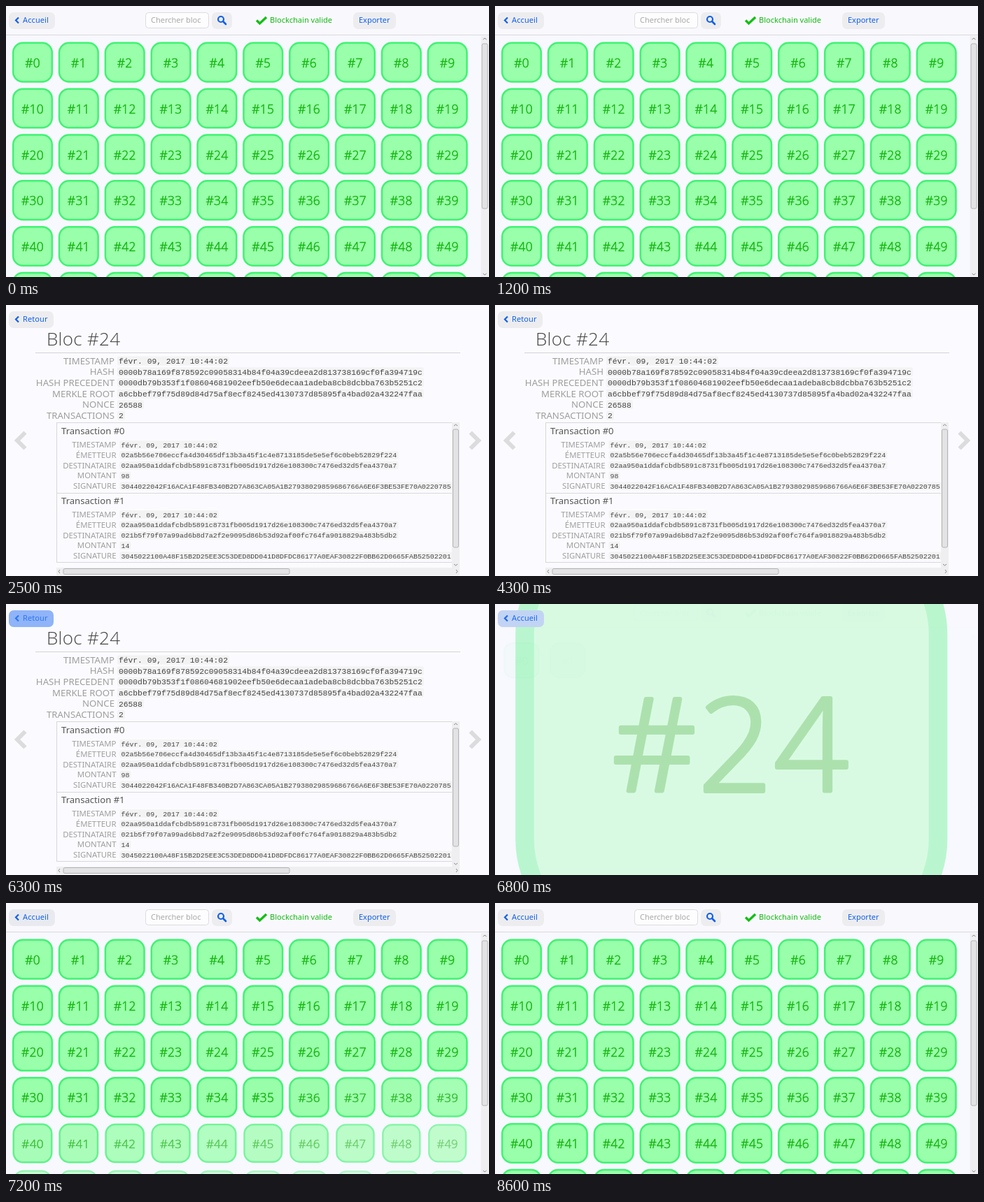
An HTML page that plays this animation: 690 px wide and 388 px high, repeating every 8900 ms.

```html
<!DOCTYPE html>
<html lang="fr">
<head>
<meta charset="utf-8">
<style>
  html, body { margin: 0; width: 100%; height: 100%; overflow: hidden; background: #f8f8ff; }
  svg { display: block; width: 690px; height: 388px; }
  text { font-family: "Noto Sans", sans-serif; white-space: pre; }
  .light { font-family: "Open Sans", "Noto Sans", sans-serif; font-weight: 300; letter-spacing: .3px; }
  .mono { font-family: "Liberation Mono", monospace; }
  .tile rect { fill: #99ffaa; stroke: #3ef472; stroke-width: 2.5; }
  .tile text { fill: #16b510; stroke: #16b510; stroke-width: .55; stroke-linejoin: round; }
</style>
</head>
<body>
<svg id="stage" viewBox="0 0 690 388"></svg>
<script>
const LOOP = 8900, OPENED = 24, PITCH = 65.85;
const BLUE = '#1160e8', BUTTON = '#ededf0';

// Markup helpers
const rect = (x, y, w, h, fill, extra = '') =>
  `<rect x="${x}" y="${y}" width="${w}" height="${h}" fill="${fill}" ${extra}/>`;
const text = (x, middle, size, fill, str, extra = '') =>
  `<text x="${x}" y="${middle + size * .357}" font-size="${size}" fill="${fill}" ${extra}>${str}</text>`;
const line = (d, color, width, extra = '') =>
  `<path d="${d}" fill="none" stroke="${color}" stroke-width="${width}" ${extra}/>`;
const group = (id, content) => `<g id="${id}">${content}</g>`;
const button = (x, w) => rect(x, 9, w, 24, BUTTON, 'rx="7"');

function scrollbar(x, y, length, from, to, vertical) {
  const bar = (a, b, size, fill, extra) => vertical
    ? rect(x + (11 - size) / 2, a, size, b - a, fill, extra)
    : rect(a, y + (11 - size) / 2, b - a, size, fill, extra);
  const start = vertical ? y : x, end = start + length;
  const tip = (p, dir) => vertical
    ? line(`M${x + 3} ${p + dir}l2.5 ${-2 * dir} 2.5 ${2 * dir}`, '#888', 1)
    : line(`M${p + dir} ${y + 3}l${-2 * dir} 2.5 ${2 * dir} 2.5`, '#888', 1);
  return bar(start, end, 11, '#efeff1') + bar(from, to, 8, '#e3e3e5', 'rx="2" stroke="#b4b4b8"')
    + tip(start + 4, 1) + tip(end - 4, -1);
}

function tile(n) {
  return `<g class="tile" id="tile${n}">${rect(-27.8, -27.8, 55.6, 55.6, '#9fa', 'rx="14"')}` +
    `<text class="light" y="7.3" font-size="17.4" text-anchor="middle">#${n}</text></g>`;
}

// Label on the left, monospaced value on a grey background
function field(right, middle, labelSize, monoSize, gap, [label, value]) {
  const x = right + gap;
  return text(right, middle, labelSize, '#9e9e9e', label, 'text-anchor="end"') +
    rect(x - 2, middle - monoSize * .57, value.length * monoSize * .6 + 4, monoSize * 1.14, '#f3f3f4', 'rx="2"') +
    text(x, middle, monoSize, '#444', value, 'class="mono"');
}

function transaction(n, top, rows) {
  return text(79, top + 11, 13.1, '#555', `Transaction #${n}`) +
    rows.map((row, i) => field(157.5, top + 31 + i * 14.8, 11.4, 9.95, 7, row)).join('');
}

const DATE = 'févr. 09, 2017 10:44:02';
const WALLET = '02aa950a1ddafcbdb5891c8731fb005d1917d26e108300c7476ed32d5fea4370a7';
const block = [
  ['TIMESTAMP', DATE],
  ['HASH', '0000b78a169f878592c09058314b84f04a39cdeea2d813738169cf0fa394719c'],
  ['HASH PRECEDENT', '0000db79b353f1f08604681902eefb50e6decaa1adeba8cb8dcbba763b5251c2'],
  ['MERKLE ROOT', 'a6cbbef79f75d89d84d75af8ecf8245ed4130737d85895fa4bad02a432247faa'],
  ['NONCE', '26588'],
  ['TRANSACTIONS', '2'],
];
const transfers = [[
  ['TIMESTAMP', DATE],
  ['ÉMETTEUR', '02a5b56e706eccfa4d30465df13b3a45f1c4e8713185de5e5ef6c0beb52829f224'],
  ['DESTINATAIRE', WALLET],
  ['MONTANT', '98'],
  ['SIGNATURE', '3044022042F16ACA1F48FB340B2D7A863CA05A1B27938029859686766A6E6F3BE53FE70A0220785'],
], [
  ['TIMESTAMP', DATE],
  ['ÉMETTEUR', WALLET],
  ['DESTINATAIRE', '021b5f79f07a99ad6b8d7a2f2e9095d86b53d92af00fc764fa9018829a483b5db2'],
  ['MONTANT', '14'],
  ['SIGNATURE', '3045022100A48F15B2D25EE3C53DED8DD041D8DFDC86177A0EAF30822F0BB62D0665FAB52502201'],
]];

const order = [...Array(60).keys()];
const header =
  rect(0, 0, 690, 41, '#f9f9fd') + rect(0, 41, 690, 1, '#d9d9de') +
  rect(199.5, 9.5, 90, 22, '#fdfdff', 'rx="4" stroke="#dcdce0"') +
  text(207, 20.5, 11, '#aaa', 'Chercher bloc') +
  button(294, 29) +
  `<circle cx="307" cy="19" r="4" fill="none" stroke="${BLUE}" stroke-width="2.2"/>` +
  line('M310 22l4 4', BLUE, 2.6, 'stroke-linecap="round"') +
  line('M358 20.5l4.5 4.5 9.5-9', '#12c012', 3.4) +
  text(377, 20.5, 11, '#12b812', 'Blockchain valide') +
  button(496, 61) + text(504, 20.5, 11, BLUE, 'Exporter');

const detail =
  rect(0, 0, 690, 388, '#fbfbff') +
  text(58, 48.5, 26, '#444', `Bloc #${OPENED}`, 'class="light"') +
  rect(42, 68, 607, 1, '#d4d4d8') +
  block.map((row, i) => field(155, 80 + i * 15.65, 13.2, 11.3, 6, row)).join('') +
  rect(72.5, 168.5, 575, 200, 'none', 'stroke="#d8d8dc"') + rect(72, 269, 565, 1, '#d8d8dc') +
  transfers.map((rows, i) => transaction(i, 169 + i * 100, rows)).join('') +
  scrollbar(637, 168, 208, 178, 347, true) + scrollbar(72, 376, 576, 82, 405, false) +
  line('M27.5 182.5l-11.5 11.5 11.5 11.5M663.5 182.5l11.5 11.5-11.5 11.5', '#dcdcdf', 6);

stage.innerHTML =
  group('scroll', scrollbar(678.5, 43, 345, 54, 290, true)) +
  group('header', header) +
  order.filter(n => n !== OPENED).map(tile).join('') + tile(OPENED) +
  group('detail', detail) +
  group('nav',
    rect(4, 9, 66, 24, BUTTON, 'rx="7" id="navBack"') +
    line('M18 16.5l-4 4 4 4', BLUE, 2.2) +
    text(24, 20.5, 11, BLUE, '', 'id="navLabel" letter-spacing=".1"') +
    rect(4, 9, 66, 24, '#4488ff', 'rx="7" id="navTint"'));

const el = id => document.getElementById(id);
const set = (id, attrs) => { for (const k in attrs) el(id).setAttribute(k, attrs[k]); };
const ramp = (t, start, duration) => Math.min(1, Math.max(0, (t - start) / duration));
const ease = u => u < .5 ? 4 * u ** 3 : 1 - 4 * (1 - u) ** 3;

function draw(t) {
  const leaving = t < 4000;

  order.forEach(n => {
    let x = 38 + n % 10 * PITCH, y = 80.6 + Math.floor(n / 10) * PITCH, scale, opacity;
    if (n === OPENED) {
      const zoom = leaving ? ease(ramp(t, 2006, 460)) : 1 - ease(ramp(t, 6636, 460));
      x += (346 - x) * zoom;
      y += (185 - y) * zoom;
      scale = 1 + 11.8 * zoom;
      opacity = 1 - zoom * zoom;
    } else {
      opacity = leaving ? 1 - ramp(t, 2073 + 6.6 * n, 110) : ramp(t, 6792 + 6 * n, 200);
      scale = .88 + .12 * opacity;
    }
    set('tile' + n, { transform: `translate(${x} ${y}) scale(${scale})`, opacity });
  });

  const top = leaving ? 1 - ramp(t, 2150, 200) : ramp(t, 6794, 220);
  set('header', { opacity: top, transform: `translate(0 ${-8 * (1 - top)})` });
  set('scroll', { opacity: top });
  set('detail', { opacity: leaving ? ramp(t, 2250, 200) : 1 - ramp(t, 6380, 240) });

  const inside = t >= 2300 && t < 6600, width = inside ? 64 : 66;
  el('navLabel').textContent = inside ? 'Retour' : 'Accueil';
  set('navBack', { width });
  set('navTint', { width, opacity: t < 6300 ? 0 : .55 * (1 - ramp(t, 6300, 940)) });
}

(function frame() {
  draw(performance.now() % LOOP);
  requestAnimationFrame(frame);
})();
</script>
</body>
</html>
```
